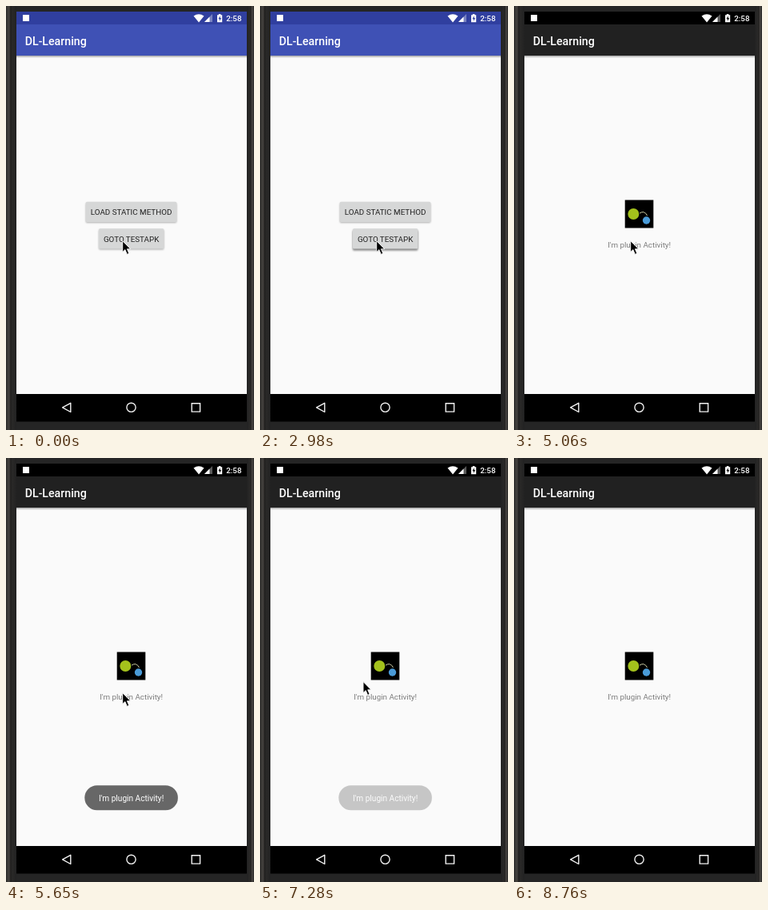
These frames come from a looping animation (310 by 530 pixels, 9.65 s). An HTML page:

```html
<!DOCTYPE html>
<html lang="en">
<head>
<meta charset="utf-8">
<title>Plugin demo</title>
<style>
html, body { margin: 0; width: 100%; height: 100%; overflow: hidden; background: #222; }
svg { display: block; width: 310px; height: 530px; }
text { font: 9.8px Roboto, sans-serif; }
.medium { font-weight: 500; }
.title { font-size: 14.2px; }
.note { font-size: 10.1px; }
</style>
</head>
<body>
<svg viewBox="0 0 310 530">
  <defs>
    <linearGradient id="shade" x2="0" y2="1">
      <stop stop-color="#000" stop-opacity=".36"/>
      <stop offset="1" stop-color="#000" stop-opacity="0"/>
    </linearGradient>
    <linearGradient id="side">
      <stop stop-color="#2a2928"/>
      <stop offset=".15" stop-color="#3b3936"/>
      <stop offset=".3" stop-color="#45423f"/>
      <stop offset=".45" stop-color="#1f1e1d"/>
      <stop offset=".6" stop-color="#2a2928"/>
      <stop offset="1" stop-color="#222"/>
    </linearGradient>
    <filter id="blur" x="-10%" y="-30%" width="120%" height="160%"><feGaussianBlur stdDeviation="1.3"/></filter>
  </defs>

  <!-- phone body and screen -->
  <path fill="#252525" d="M0 0h310v530H0z"/>
  <path fill="url(#side)" d="M0 0h13v530H0z"/>
  <path fill="url(#side)" d="M0 0h9v530H0z" transform="matrix(-1 0 0 1 310 0)"/>
  <path fill="#fafafa" d="M13 62h288v423H13z"/>
  <path id="status" d="M13 7h288v16H13z"/>
  <path id="bar" d="M13 23h288v39H13z"/>
  <path fill="url(#shade)" d="M13 62h288v3H13z"/>
  <path fill="#000" d="M13 485h288v34.5H13z"/>
  <text class="medium title" x="23.7" y="48.5" fill="#fff">DL-Learning</text>

  <!-- status icons -->
  <g fill="#fff">
    <path d="M21 11h8v8h-8z"/>
    <path d="M234.5 12.5Q241 7.8 247.5 12.5L241 20.5z"/>
    <path d="M258 10v10h-10z" opacity=".35"/>
    <path d="M254.5 13.5V20H248z"/>
    <path d="M264 11.2h1.8V10h2.6v1.2h1.8V20.3H264z"/>
    <path id="bolt" d="M267.7 12.3l-2.3 3.9h1.5v2.8l2.2-4h-1.4z"/>
    <text class="medium" x="275.2" y="19">2:58</text>
  </g>

  <!-- navigation -->
  <g fill="none" stroke="#f2f2f2" stroke-width="1.4">
    <path d="M80.8 496.3v11.2L70.6 501.9z" stroke-linejoin="round"/>
    <circle cx="156.5" cy="501.8" r="5.6"/>
    <path d="M232.2 496.7h10.4v10.4h-10.4z"/>
  </g>

  <g id="home">
    <rect x="99.8" y="246" width="113.4" height="25" rx="1.5" opacity=".3" filter="url(#blur)"/>
    <rect x="99.8" y="244.8" width="113.4" height="25.2" rx="1.5" fill="#d6d7d7"/>
    <rect x="116" y="279.5" width="81.3" height="25" rx="1.5" opacity=".3" filter="url(#blur)"/>
    <rect id="lift" x="116" y="281" width="81.3" height="25" rx="1.5" opacity=".3" filter="url(#blur)"/>
    <rect x="116" y="278.3" width="81.3" height="25.2" rx="1.5" fill="#d6d7d7"/>
    <g class="medium" fill="#202020" text-anchor="middle">
      <text x="156.6" y="261">LOAD STATIC METHOD</text>
      <text x="156.6" y="294.5">GOTO TESTAPK</text>
    </g>
  </g>

  <g id="plugin">
    <path d="M138.7 242.5h35.6v35h-35.6z"/>
    <circle cx="149.3" cy="260" r="7" fill="#a4c21c"/>
    <circle cx="165.5" cy="268" r="4.7" fill="#4a9bd8"/>
    <path d="M157 259q6-4 9.5 3" fill="none" stroke="#c8c8a0"/>
    <text x="156.6" y="302" fill="#7c7c7c" text-anchor="middle">I'm plugin Activity!</text>
  </g>

  <g id="toast">
    <rect x="98.3" y="409.2" width="116.6" height="31" rx="15.5" fill="#676767"/>
    <text class="note" x="156.6" y="429" fill="#fff" text-anchor="middle">I'm plugin Activity!</text>
  </g>

  <g id="cursor">
    <path d="M1 .6V14.6L4.2 11.6 6.6 17.4 9.1 16.3 6.7 10.8H11z" fill="#000" stroke="#fff" stroke-width=".9"/>
  </g>
</svg>
<script>
const LOOP = 9650;
const el = id => document.getElementById(id);
const show = (id, on) => { el(id).style.display = on ? '' : 'none'; };

const pointer = [
  [0, 144.7, 293], [6400, 142, 294.5], [6550, 126, 316], [6690, 107, 323],
  [6840, 88, 230], [6980, 162, 182], [7130, 148, 270], [7280, 128, 279],
  [7430, 124, 272], [7570, 151.5, 230], [7720, 196, 232.5], [7870, 202, 311],
  [8020, 123, 426], [8310, 139, 444], [8460, 206.5, 510]
];
// [time, opacity]
const toast = [[0, 0], [5510, .6], [5650, 1], [7130, .8], [7280, .35], [7430, 0]];
const at = (steps, t) => steps.findLast(s => s[0] <= t);

function draw(t) {
  const plugin = t >= 5060;
  const statusColor = plugin ? '#000' : '#303f9f';
  show('home', !plugin);
  show('plugin', plugin);
  show('lift', t >= 1940 && t < 4310);
  show('cursor', t < 8760);
  el('status').setAttribute('fill', statusColor);
  el('bolt').setAttribute('fill', statusColor);
  el('bar').setAttribute('fill', plugin ? '#212121' : '#3f51b5');
  el('toast').setAttribute('opacity', at(toast, t)[1]);
  const [, x, y] = at(pointer, t);
  el('cursor').setAttribute('transform', `translate(${x} ${y})`);
}

const start = performance.now();
function tick() {
  draw((performance.now() - start) % LOOP);
  requestAnimationFrame(tick);
}
tick();
</script>
</body>
</html>
```
